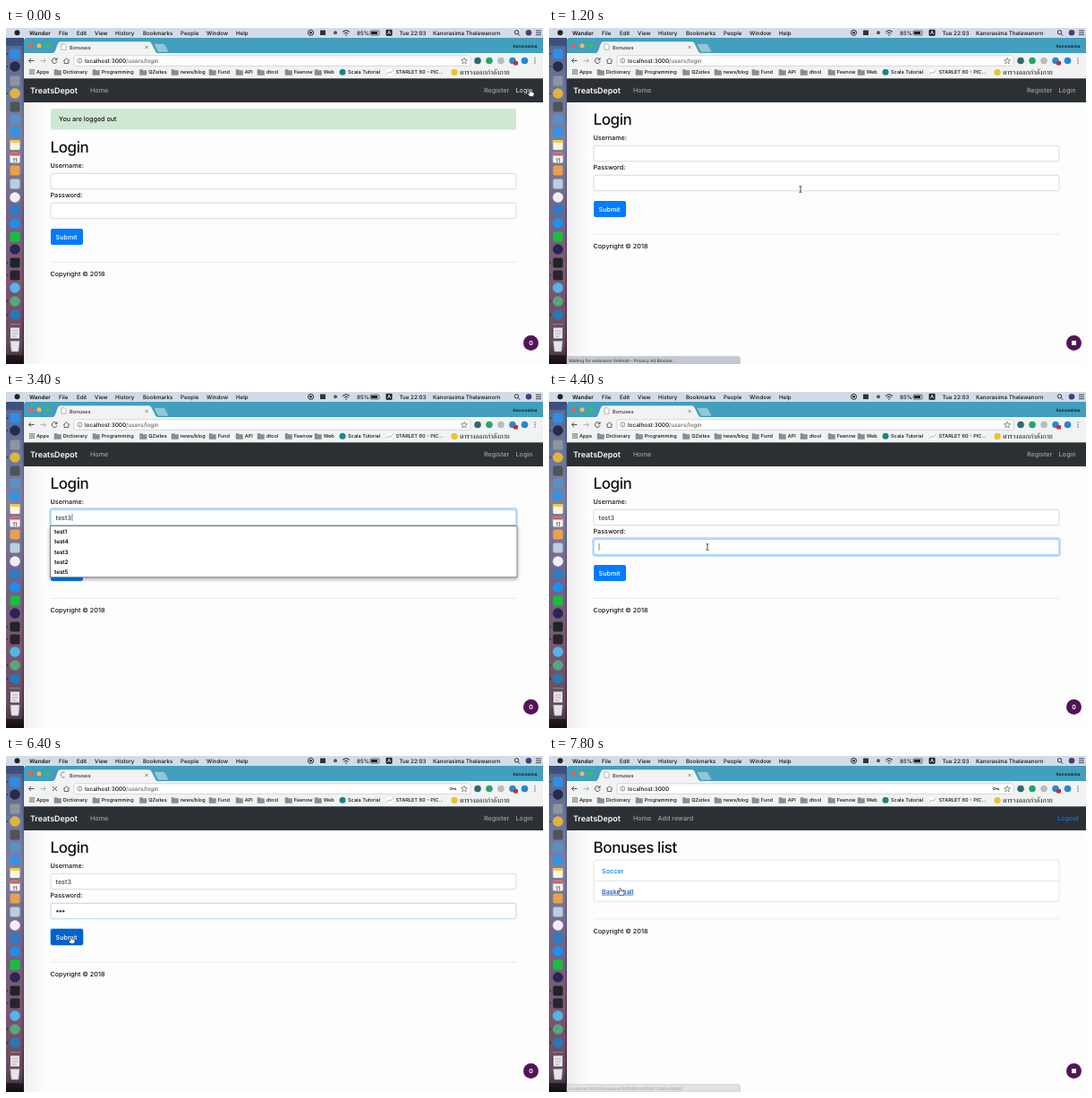
An HTML page for the animation above (8 s loop, 600 by 375 pixels).

```html
<!DOCTYPE html>
<html lang="en">
<head>
<meta charset="utf-8">
<title>Login walkthrough</title>
<style>
  html, body { margin: 0; width: 100%; height: 100%; overflow: hidden; background: #fdfdfd; }
  svg { display: block; width: 100vw; height: 100vh; }
  text { font-family: Inter, "Noto Sans", sans-serif; font-weight: 450; text-rendering: geometricPrecision; }
  .bold { font-weight: 600; }
</style>
</head>
<body>
<svg viewBox="0 0 600 375">
  <defs>
    <linearGradient id="wall" x2="0" y2="1">
      <stop offset="0" stop-color="#3a4f7d"/><stop offset=".3" stop-color="#6a6c90"/>
      <stop offset=".55" stop-color="#5b4a70"/><stop offset=".75" stop-color="#673a55"/>
      <stop offset=".93" stop-color="#4c2b40"/><stop offset="1" stop-color="#120d12"/>
    </linearGradient>
    <linearGradient id="edge">
      <stop offset="0" stop-opacity=".06"/><stop offset="1" stop-opacity="0"/>
    </linearGradient>
    <filter id="shadow" x="-5%" y="-10%" width="110%" height="130%">
      <feDropShadow dx="0" dy="2" stdDeviation="2" flood-opacity=".35"/>
    </filter>
  </defs>
  <g id="desktop"></g>
  <g id="live"></g>
</svg>
<script>
const LOOP = 8000, STEP = 200;
const BLUE = '#007bff', INK = '#111', MUTED = '#a0a3a6';

const rect = (x, y, w, h, fill, more = '') =>
  `<rect x="${x}" y="${y}" width="${w}" height="${h}" fill="${fill}" ${more}/>`;
const circle = (x, y, r, fill, more = '') =>
  `<circle cx="${x}" cy="${y}" r="${r}" fill="${fill}" ${more}/>`;
const text = (x, y, size, value, fill = INK, more = '') =>
  `<text x="${x}" y="${y}" font-size="${size}" fill="${fill}" ${more}>${value}</text>`;
const path = (d, stroke, width = 1, fill = 'none') =>
  `<path d="${d}" stroke="${stroke}" stroke-width="${width}" fill="${fill}"/>`;
const clamp = (v, lo, hi) => Math.max(lo, Math.min(hi, v));

function menuBar() {
  const items = [['File', 59], ['Edit', 79], ['View', 99], ['History', 122], ['Bookmarks', 153],
    ['People', 195], ['Window', 224], ['Help', 257], ['85%', 392], ['Tue 22:03', 439.5],
    ['Kanorasima Thelawanorn', 477]];
  return rect(0, 0, 600, 11, '#d3dbe8') +
    circle(12.5, 5.2, 3, '#222') +
    text(26, 7.8, 6.3, 'Wander', INK, 'class="bold"') +
    items.map(([label, x]) => text(x, 7.8, 6.2, label)).join('') +
    circle(340.5, 5.3, 3, 'none', 'stroke="#222"') + circle(340.5, 5.3, 1.3, '#222') +
    rect(351, 2.5, 6, 5.5, '#333') + circle(368, 5.3, 2, '#555') +
    path('M376 4.5Q380 1 384 4.5M377.6 6.2Q380 4 382.4 6.2', '#222') + circle(380, 8, .8, '#222') +
    rect(407, 3, 10, 5, 'none', 'stroke="#333" stroke-width=".7" rx="1"') + rect(408, 4, 7, 3, '#222') +
    rect(424.5, 1.7, 7, 7, '#222', 'rx="1"') + text(426, 7.4, 5.8, 'A', '#fff') +
    circle(570.5, 4.8, 2.2, 'none', 'stroke="#222" stroke-width=".9"') + path('M572 6.5l2 2', '#222') +
    circle(584, 5.3, 3.3, '#4b3c78') +
    path('M592 3h6M592 5.3h6M592 7.6h6', '#222', .8);
}

function dock() {
  const round = { 43: '#252c4b', 73: '#e2b43d', 116: '#2f94e6', 189: '#f2eef6', 218: '#1e8ff0',
    247: '#2c2453', 290: '#52b5eb', 305: '#56a77d', 320: '#2679b8' };
  const square = { 29: '#2b8fe8', 59: '#8d959e', 88: '#4e5358', 102: '#5a91c4', 159: '#e9a24c',
    174: '#b8cfdf', 203: '#2f79c6', 233: '#18bf3b', 262: '#1d2621', 276: '#27232f' };
  return rect(0, 11, 20, 364, 'url(#wall)') + rect(0, 20, 18.5, 345, '#d5d8e5', 'opacity=".18"') +
    Object.entries(round).map(([y, c]) => circle(10, y, 5.8, c)).join('') +
    Object.entries(square).map(([y, c]) => rect(4.5, y - 5.5, 11, 11, c, 'rx="2"')).join('') +
    rect(4.5, 125, 11, 11, '#faf6df', 'rx="1.5"') + rect(4.5, 125, 11, 3, '#f2c94b') +
    rect(4.5, 139.5, 11, 11, '#fff', 'rx="1.5"') + rect(4.5, 139.5, 11, 3, '#e5534d') +
    text(10, 149.5, 6.5, '11', '#333', 'text-anchor="middle"') +
    path('M4 330.5h12', '#aaa6b4', .6) +
    rect(5, 334.5, 10, 12, '#e8e8e8') + path('M6.5 338h7M6.5 341h7M6.5 344h5', '#999', .7) +
    path('M5 349.5h10l-1.2 11.5h-7.6z', '#b9bcc0', .7, '#e3e5e7') +
    [29, 43, 73, 262, 276, 305, 320].map(y => circle(1.6, y, .7, '#151515')).join('');
}

function browserFrame() {
  const folders = [['Dictionary', 54], ['Programming', 97], ['QZsites', 149.5], ['news/blog', 185],
    ['Fund', 227], ['API', 257], ['dtool', 281], ['Feenow', 312], ['Web', 345]];
  const folder = ([label, x]) =>
    path(`M${x} 46.5h3l.8 1h3.7v5h-7.5z`, '#777', .4, '#8b8e91') + text(x + 9.7, 51.3, 5.6, label);
  const apps = [0, 1, 2].flatMap(r => [0, 1, 2].map(c =>
    rect(26 + c * 2.2, 46 + r * 2.2, 1.6, 1.6, ['#de5b4e', '#4d9b62', '#477fd0'][(r + c) % 3]))).join('');
  const extensions = [[527, '#2f6a70'], [540, '#27a567'], [553, '#b9bdc0'], [566, '#2d87c9'], [579.5, '#2586cf']];
  return path('M20 56V14q0-3 3-3h577v45z', 'none', 0, '#429fbd') +
    rect(20, 28, 580, 28.5, '#f1f2f2') +
    path('M51 28.2q3 0 4-3l3-8q1-2 3-2h98.5q2 0 3 2l4 8q1 3 4 3z', 'none', 0, '#f1f2f2') +
    path('M166 17.5q-1 0 0 2l3 6q1 1.5 2 1.5h10q1 0 .3-1.5l-3-6q-1-2-2.5-2z', '#3489a6', .4, '#91c7d8') +
    [['#fc5b57', 27.5], ['#fdbc40', 37], ['#34c84a', 46.5]].map(([c, x]) => circle(x, 19.7, 2.5, c)).join('') +
    text(71, 23.5, 5.7, 'Bonuses', '#333') +
    path('M155.5 19.8l3.2 3.2m0-3.2l-3.2 3.2', '#666', .7) +
    text(593.5, 21.8, 4.7, 'Kanorasima', '#0b1c24', 'text-anchor="end" class="bold"') +
    path('M31.5 36.5h-6m2.5-2.5l-2.5 2.5 2.5 2.5', '#555') +
    path('M38.5 36.5h6m-2.5-2.5l2.5 2.5-2.5 2.5', '#b5b5b5') +
    path('M64 36.8l3.5-3 3.5 3M65.2 36.5v3h4.6v-3', '#555', .9) +
    rect(76, 30.8, 443, 11.5, '#fff', 'stroke="#c6c8c9" stroke-width=".7" rx="1.5"') +
    circle(82.3, 36.5, 2.6, 'none', 'stroke="#666" stroke-width=".7"') + path('M82.3 36v2M82.3 34.7v.7', '#666', .7) +
    path('M512 33.2l1 2.3 2.5.2-1.9 1.6.6 2.5-2.2-1.4-2.2 1.4.6-2.5-1.9-1.6 2.5-.2z', '#666', .7) +
    extensions.map(([x, c]) => circle(x, 36.5, 3.8, c)).join('') + rect(567, 37, 5, 4.5, '#c52d35', 'rx="1"') +
    [34, 36.5, 39].map(y => circle(591, y, .7, '#555')).join('') +
    apps + text(34, 51.3, 5.6, 'Apps') + folders.map(folder).join('') +
    circle(376, 49.3, 3.5, '#1b8588') + text(382, 51.3, 5.6, 'Scala Tutorial') +
    rect(425, 46, 8, 7, '#fff') + path('M425 52l2.5-3 2 1.5 3-4', '#888', .7) +
    text(435.5, 51.3, 5.6, 'STARLET 60 - PIC...') +
    circle(501, 49.4, 3.6, '#e8c42f') + text(507, 51.6, 8, 'ตารางออกกำลังกาย') +
    rect(20, 56.3, 580, 26.7, '#2b3035') +
    text(27, 72.7, 8.9, 'TreatsDepot', '#fff', 'class="bold"') + text(94, 72.3, 7.2, 'Home', MUTED) +
    rect(20, 83, 580, 292, '#fdfdfd') + rect(20, 83, 24, 292, 'url(#edge)');
}

function toolbarState(loading, url, showKey) {
  return (loading
    ? path('M65.5 18.3a3 3 0 1 0 0 5.4', '#666', .8) + path('M52 34l5 5m0-5l-5 5', '#555')
    : path('M62 17.8h3.3l1.7 1.7v4.7h-5z', '#888', .6, '#fff') + path('M56.5 34.8a2.9 2.9 0 1 0 .5 2.4M57 33.2v2.3h-2.4', '#555')) +
    text(88, 38.8, 6.4, `localhost:3000<tspan fill="#666">${url}</tspan>`) +
    (showKey ? circle(497.3, 36.5, 1.3, 'none', 'stroke="#555"') + path('M498.6 36.5h4v1.6M501 36.5v1.3', '#555') : '');
}

const heading = (y, label) => text(49.5, y, 17, label, INK, 'style="font-weight:500" letter-spacing="-.4"');
const footer = y => path(`M50 ${y}h520`, '#dfe1e2', .7) + text(49.5, y + 15.7, 7.2, 'Copyright © 2018');

// focus: 2 = focus ring, 1 = ring fading out, 0 = plain
function input(y, focus, content = '') {
  const border = ['#ced2d6', '#a9cbef', '#80bdff'][focus];
  return (focus === 2 ? rect(49, y - 1, 522, 20, 'none', 'stroke="#bfdcff" stroke-width="1.8" rx="3"') : '') +
    rect(50, y + .3, 520, 17.4, '#fff', `stroke="${border}" stroke-width=".8" rx="2"`) + content;
}

const caret = (x, y) => path(`M${x} ${y}v8`, '#333', .6);

function suggestions(filtered) {
  const names = filtered ? ['test1', 'test4', 'test3', 'test2', 'test5']
    : ['c4827361950', 'c4827361950@zqx.ac.th', 'nimnoi', 'test1', 'test4', 'pok'];
  return rect(49.5, 149.5, 521.5, names.length * 11.25 + 1, '#fff', 'stroke="#666a6e" stroke-width=".8" filter="url(#shadow)"') +
    names.map((name, i) => text(54, 158.2 + i * 11.2, 6.3, name, '#000', 'class="bold"')).join('');
}

function loginPage(t) {
  const loggedOut = t < 400, dy = loggedOut ? 31 : 0;
  const typed = 'test3'.slice(0, clamp(Math.floor((t - 2600) / 160), 0, 5));
  const dots = clamp(Math.floor((t - 4600) / 300), 0, 3);
  const blink = Math.floor(t / 500) % 2 === 0;
  const nameFocus = t >= 1800 && t < 4000;
  const passFocus = t >= 4000 && t < 6400;
  const pressed = t >= 6400, hover = t >= 6200;

  const name = text(55.5, 142.9, 7.2, typed, '#3b4147') +
    (nameFocus && blink ? caret(56 + typed.length * 3.6, 136) : '');
  const pass = Array.from({ length: dots }, (_, i) => circle(57.4 + i * 3.4, 173.3, 1.25, '#3e444a')).join('') +
    (passFocus && blink ? caret(56 + dots * 3.4, 169) : '');

  return (loggedOut ? rect(50, 90, 520, 23.5, '#cfe8d3', 'rx="2"') + text(59, 104.3, 7.2, 'You are logged out') : '') +
    text(534, 72.3, 7.2, 'Register', MUTED) + text(569.5, 72.3, 7.2, 'Login', loggedOut ? '#cfd2d4' : MUTED) +
    `<g transform="translate(0 ${dy})">` +
    heading(108, 'Login') + text(49.5, 124.5, 7.2, 'Username:') + input(131, nameFocus ? 2 : 0, name) +
    text(49.5, 157.5, 7.2, 'Password:') + input(164, passFocus ? 2 : t === 6400 ? 1 : 0, pass) +
    (pressed ? rect(49, 192, 38, 20, '#b3d3fb', 'rx="3"') : '') +
    rect(50, 193, 36, 18, pressed ? '#0062cc' : hover ? '#0069d9' : BLUE, 'rx="2"') +
    text(55.5, 204.8, 7.2, 'Submit', '#fff') + footer(230.3) +
    (t >= 2000 && t < 4000 ? suggestions(typed.length > 0) : '') + '</g>';
}

function listPage(t) {
  const hover = t >= 7600;
  return text(121.5, 72.3, 7.2, 'Add reward', MUTED) + text(568, 72.3, 7.2, 'Logout', BLUE) +
    heading(108, 'Bonuses list') +
    rect(50, 116.3, 520, 46, '#fff', 'stroke="#dcdfe1" stroke-width=".8" rx="2"') + path('M50 139.3h520', '#dcdfe1', .8) +
    text(59, 130.7, 7.2, 'Soccer', BLUE) +
    text(59, 153.7, 7.2, 'Basketball', hover ? '#0056b3' : BLUE, hover ? 'text-decoration="underline"' : '') +
    footer(181.8);
}

function statusBar(label, fill, ink) {
  return path('M20 375v-8.5h191q2.5 0 2.5 2.5v6z', '#b9bdc1', .5, fill) + text(22, 373, 4.8, label, ink);
}

function badge(idle) {
  return circle(586.5, 351.5, 8.5, '#521459') +
    (idle ? text(586.5, 354, 7, '0', '#fff', 'text-anchor="middle" class="bold"') : rect(584, 349, 5, 5, '#fff'));
}

const pointerKeys = [[0, 586, 72], [400, 586, 72], [1200, 281, 180], [1700, 230, 141], [3600, 230, 141],
  [4200, 177, 173], [5400, 177, 173], [6200, 73, 205], [6800, 73, 205], [7600, 80, 151], [8000, 80, 151]];

function pointer(t) {
  if ((t >= 2400 && t < 3800) || (t >= 4600 && t < 5600)) return '';
  const i = pointerKeys.findIndex(key => key[0] > t);
  const [t0, x0, y0] = pointerKeys[i - 1], [t1, x1, y1] = pointerKeys[i];
  const u = (t - t0) / (t1 - t0), e = u * u * (3 - 2 * u);
  const x = x0 + (x1 - x0) * e, y = y0 + (y1 - y0) * e;
  const within = (l, top, r, b) => x >= l && x <= r && y >= top && y <= b;
  const onForm = t >= 400 && t < 7000;
  const onField = onForm && (within(50, 131, 570, 149) || within(50, 164, 570, 182));
  const onLink = t < 400 || (onForm ? within(50, 193, 86, 211) : within(59, 147, 95, 156));
  const shape = onField
    ? path('M-1.5-3.5q1.5 0 1.5 1v5q0 1-1.5 1M1.5-3.5q-1.5 0-1.5 1M0 2.5q0 1 1.5 1', '#222', .8)
    : onLink
      ? path('M-1.2-3.2q.9-.9 1.6 0v2.5l3 .7q1 .5.6 2l-.8 2.5h-4l-2.5-3q0-1 1-.8l1.1.8z', '#222', .6, '#fff')
      : path('M0-3v7l1.7-1.6 1.2 2.6 1.2-.6-1.2-2.5h2.2z', '#fff', .5, '#111');
  return `<g transform="translate(${x} ${y})">${shape}</g>`;
}

function scene(t) {
  const onList = t >= 7000;
  const loading = (t >= 200 && t < 600) || (t >= 6400 && t < 7000);
  const idle = t < 400 || (t >= 2800 && t < 7000);
  return toolbarState(loading, onList ? '' : '/users/login', t >= 6400) +
    (onList ? listPage(t) : loginPage(t)) + badge(idle) +
    (t >= 600 && t < 1600 ? statusBar('Waiting for extension Veilmist - Privacy Ad Blocker...', '#c3c9ce', '#444') : '') +
    (t >= 7600 ? statusBar('localhost:3000/bonuses/5b97d90cd150b72463e9b882', '#e1e2e3', '#a5a7a9') : '') +
    pointer(t);
}

document.getElementById('desktop').innerHTML = menuBar() + dock() + browserFrame();
const live = document.getElementById('live');
let shown = -1;

function tick() {
  const t = Math.floor(performance.now() % LOOP / STEP) * STEP;
  if (t !== shown) live.innerHTML = scene(shown = t);
  requestAnimationFrame(tick);
}
tick();
</script>
</body>
</html>
```
